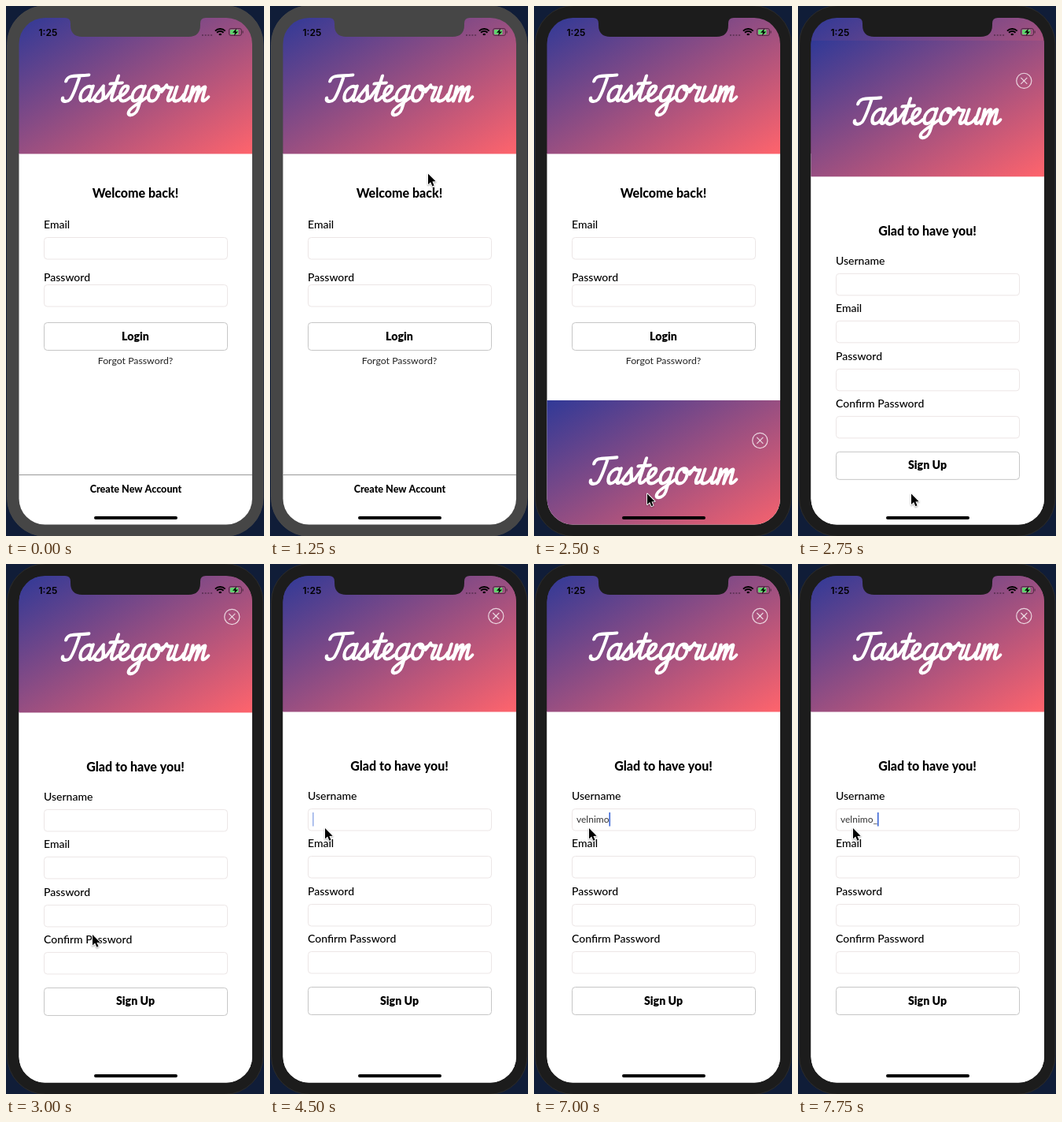
Recreate the animation shown at these times as an HTML page with a canvas. Size 328 by 672 pixels, loop 8000 ms.

```html
<!DOCTYPE html>
<html lang="en">
<head>
<meta charset="utf-8">
<title>Sign up</title>
<style>
html, body { margin: 0; width: 100%; height: 100%; overflow: hidden; background: #101d38; }
canvas { display: block; width: 328px; height: 672px; }
</style>
</head>
<body>
<canvas id="stage"></canvas>
<script>
const W = 328, H = 672, LOOP = 8000, STEP = 250, MID = 164.5;
const canvas = document.getElementById('stage');
const ratio = window.devicePixelRatio || 1;
canvas.width = W * ratio;
canvas.height = H * ratio;
const ctx = canvas.getContext('2d');

// Script lettering: [pen path, advance], baseline at 0
const letters = {
  T: ['M4,-25C4,-34 14,-31 31,-33M20,-32C19,-20 18,-8 15,-2C12,2 5,1 5,-4', 25],
  a: ['M14,-17C8,-22 1,-14 2,-6C3,3 11,1 14,-8M15,-19L14,-5C14,2 18,0 21,-5', 20],
  s: ['M0,-4L8,-19C8,-12 14,-6 10,-1C8,1 4,1 2,-1M10,-1L16,-6', 15],
  t: ['M0,-4L7,-19M9,-32L7,-6C7,2 12,0 15,-5M1,-22L16,-23', 15],
  e: ['M0,-5C10,-8 13,-19 7,-19C0,-19 0,0 8,0C12,0 14,-3 16,-5', 16],
  g: ['M14,-17C8,-22 1,-14 2,-6C3,3 11,1 14,-8M15,-19L13,10C12,20 0,20 3,12C5,7 14,2 21,-5', 20],
  o: ['M9,-19C0,-19 0,0 8,0C17,0 17,-19 9,-19C9,-13 15,-13 19,-16', 18],
  r: ['M0,-12L4,-20C5,-16 9,-17 12,-17L10,-5C10,2 14,0 17,-5', 16],
  u: ['M2,-18L1,-5C1,3 10,1 13,-8M15,-19L14,-5C14,2 18,0 21,-5', 20],
  m: ['M2,-18L2,0C3,-12 8,-21 10,-17L10,0C11,-12 16,-21 18,-17L18,-4C18,2 22,0 25,-5', 26]
};

// Pointer stops: time, x, y
const pointerPath = [
  [1000, 253, 79], [1750, 97, 480], [2000, 125, 584], [2250, 144, 609],
  [2500, 144, 618.5], [2750, 144, 618.5], [3000, 110, 470],
  [3250, 68, 303], [3500, 70, 335]
];

// Typing: start time, text, suggestion, caret opacity
const typing = [
  [4000, '', '', 1], [4500, '', '', 0.5], [4750, '', '', 1],
  [5000, 'v', '', 1], [5250, 've', '', 1], [5500, 'vel', 'Vel', 1],
  [5750, 'velni', 'Vel Ni', 1], [6000, 'velnim', 'Vel Nim', 1],
  [6250, 'velnim', 'Vel Nim', 0.5], [6750, 'velnimo', '', 1],
  [7250, 'velnimo_', '', 1], [7500, 'velnimo_', '', 0.5], [7750, 'velnimo_', '', 1]
];

function roundRect(x, y, w, h, r, fill, stroke) {
  ctx.beginPath();
  ctx.roundRect(x, y, w, h, r);
  if (fill) { ctx.fillStyle = fill; ctx.fill(); }
  if (stroke) { ctx.strokeStyle = stroke; ctx.lineWidth = 1; ctx.stroke(); }
}

function text(str, x, y, size, weight = 500, align = 'left', color = '#000') {
  ctx.font = `${weight} ${size}px Lato, sans-serif`;
  ctx.textAlign = align;
  ctx.fillStyle = color;
  ctx.fillText(str, x, y);
}

function line(x1, y1, x2, y2, color, width = 1) {
  ctx.strokeStyle = color;
  ctx.lineWidth = width;
  ctx.beginPath();
  ctx.moveTo(x1, y1);
  ctx.lineTo(x2, y2);
  ctx.stroke();
}

function cross(x, y, r, color, width) {
  line(x - r, y - r, x + r, y + r, color, width);
  line(x - r, y + r, x + r, y - r, color, width);
}

function wordmark(word) {
  ctx.save();
  ctx.translate(66, 120.5);
  ctx.transform(1, 0, -0.25, 1, 0, 0);
  ctx.strokeStyle = '#fff';
  ctx.lineWidth = 4.2;
  ctx.lineCap = ctx.lineJoin = 'round';
  for (const ch of word) {
    const [path, advance] = letters[ch];
    ctx.stroke(new Path2D(path));
    ctx.translate(advance, 0);
  }
  ctx.restore();
}

// The other two corners of the gradient share its middle colour
function cornerGradient(x, y, w, h) {
  const k = w * h / (w * w + h * h);
  const cx = x + w / 2, cy = y + h / 2;
  const grad = ctx.createLinearGradient(cx - h * k, cy - w * k, cx + h * k, cy + w * k);
  grad.addColorStop(0, '#303997');
  grad.addColorStop(1, '#ff646c');
  return grad;
}

function header() {
  ctx.fillStyle = '#fff';
  ctx.fillRect(16, 187, 298, 471);
  ctx.fillStyle = cornerGradient(16, 15, 297, 172.5);
  ctx.fillRect(16, 15, 298, 172.5);
  wordmark('Tastegorum');
}

function field(y) {
  roundRect(48.5, y + 0.5, 233, 27.5, 4, '#fff', '#ece6e6');
}

function button(label, y) {
  roundRect(48.5, y, 233, 35, 4, '#fff', '#c6c6c6');
  text(label, MID, y + 22, 14.2, 900, 'center');
}

function loginPage() {
  header();
  text('Welcome back!', MID, 243, 16, 800, 'center');
  text('Email', 48, 282, 14);
  field(293);
  text('Password', 48, 349, 14);
  field(353);
  button('Login', 401.5);
  text('Forgot Password?', MID, 454, 12.3, 400, 'center', '#222');
  line(16, 594.5, 314, 594.5, '#999');
  text('Create New Account', MID + 0.5, 617, 12.6, 800, 'center');
}

function signUpPage(t) {
  header();
  ctx.strokeStyle = 'rgba(255,255,255,.75)';
  ctx.lineWidth = 1.2;
  ctx.beginPath();
  ctx.arc(287.3, 66, 9.6, 0, Math.PI * 2);
  ctx.stroke();
  cross(287.3, 66, 4, 'rgba(255,255,255,.75)', 1.2);
  text('Glad to have you!', MID, 262, 16, 800, 'center');
  ['Username', 'Email', 'Password', 'Confirm Password'].forEach((label, i) => {
    text(label, 48, 299 + i * 60.4, 14);
    field(Math.round(310 + i * 60.4));
  });
  button('Sign Up', 536.5);
  usernameInput(t);
}

function usernameInput(t) {
  const state = typing.filter(s => s[0] <= t).pop();
  if (!state) return;
  const [, typed, hint, alpha] = state;
  ctx.font = '400 12px Lato, sans-serif';
  const end = 54 + ctx.measureText(typed).width;
  if (hint) {
    ctx.fillStyle = '#c9d8e8';
    ctx.fillRect(52, 315, end - 51, 17.5);
  }
  text(typed, 54, 328, 12, 400, 'left', '#333');
  ctx.globalAlpha = alpha;
  ctx.fillStyle = '#3a66d6';
  ctx.fillRect(end, 315, 1.6, 17.5);
  ctx.globalAlpha = 1;
  if (hint) {
    ctx.font = '400 12.4px Lato, sans-serif';
    const width = ctx.measureText(hint).width;
    roundRect(51.5, 333.5, width + 20, 20.5, [2, 10, 10, 10], '#fbfbfb', '#cfcfcf');
    text(hint, 54, 348, 12.4, 400, 'left', '#2f7bd9');
    cross(54 + width + 6.5, 344, 2.8, '#b5b5b5', 1);
  }
}

function statusBar() {
  ctx.font = '600 12px Inter, sans-serif';
  ctx.textAlign = 'left';
  ctx.fillStyle = '#000';
  ctx.fillText('1:25', 41.5, 37.8);
  ctx.fillStyle = 'rgba(0,0,0,.3)';
  for (let i = 0; i < 4; i++) ctx.fillRect(249 + i * 3.7, 36, 2, 2);

  ctx.strokeStyle = '#000';
  ctx.lineWidth = 1.9;
  for (const r of [9, 6, 2]) {
    ctx.beginPath();
    ctx.arc(272.3, 38, r, -Math.PI * 0.75, -Math.PI * 0.25);
    ctx.stroke();
  }
  roundRect(283.5, 28.5, 16, 9, 2.5, null, 'rgba(0,0,0,.45)');
  roundRect(285, 30, 10.5, 6, 1, '#62d36f');
  ctx.fillStyle = 'rgba(0,0,0,.45)';
  ctx.fillRect(300.5, 31.5, 1.2, 3);
  ctx.fillStyle = '#000';
  ctx.fill(new Path2D('M293,28.5L288,33.7L291,33.7L290,37.8L295,32.4L292,32.4Z'));
}

function notch(color) {
  ctx.fillStyle = color;
  ctx.fill(new Path2D('M75,14L75,15Q82,15 82,22L82,24Q82,39 97,39L232,39Q247,39 247,24L247,22Q247,15 254,15L254,14Z'));
}

// Critically damped rise of the sheet
function sheetOffset(t) {
  const x = Math.max(0, t - 2439.5) * 0.0157;
  return 643 * (1 + x) * Math.exp(-x);
}

function pointerAt(t) {
  const next = pointerPath.findIndex(p => p[0] > t);
  if (next === 0) return null;
  if (next < 0) return pointerPath[pointerPath.length - 1].slice(1);
  const [t0, x0, y0] = pointerPath[next - 1], [t1, x1, y1] = pointerPath[next];
  const k = (t - t0) / (t1 - t0);
  return [x0 + (x1 - x0) * k, y0 + (y1 - y0) * k];
}

function pointer(t) {
  const pos = pointerAt(t);
  if (!pos) return;
  const arrow = new Path2D('M0,0L0,15L3.5,11.8L6,17.5L8.4,16.4L6,11L10.7,10.7Z');
  ctx.save();
  ctx.translate(...pos);
  ctx.scale(0.9, 0.9);
  ctx.lineJoin = 'round';
  ctx.strokeStyle = '#fff';
  ctx.lineWidth = 2;
  ctx.shadowColor = 'rgba(0,0,0,.35)';
  ctx.shadowBlur = 2 * ratio;
  ctx.shadowOffsetY = ratio;
  ctx.stroke(arrow);
  ctx.shadowColor = 'transparent';
  ctx.fillStyle = '#000';
  ctx.fill(arrow);
  ctx.restore();
}

function draw(t) {
  const active = t >= 2500;
  const bezel = active ? '#1c1c1c' : '#464646';
  ctx.setTransform(ratio, 0, 0, ratio, 0, 0);
  ctx.fillStyle = '#101d38';
  ctx.fillRect(0, 0, W, H);
  roundRect(1.5, -0.5, 325.5, 673, 49, bezel, active ? '#2c2c2c' : '#484848');

  ctx.save();
  ctx.beginPath();
  ctx.roundRect(16.5, 15, 296.5, 642.5, 33);
  ctx.clip();
  loginPage();
  if (active) {
    ctx.translate(0, sheetOffset(t));
    signUpPage(t);
  }
  ctx.restore();

  notch(bezel);
  statusBar();
  roundRect(112, 647, 106, 4, 2, '#000');
  pointer(t);
}

function tick() {
  const t = performance.now() % LOOP;
  draw(Math.floor(t / STEP) * STEP);
  requestAnimationFrame(tick);
}
tick();
</script>
</body>
</html>
```
